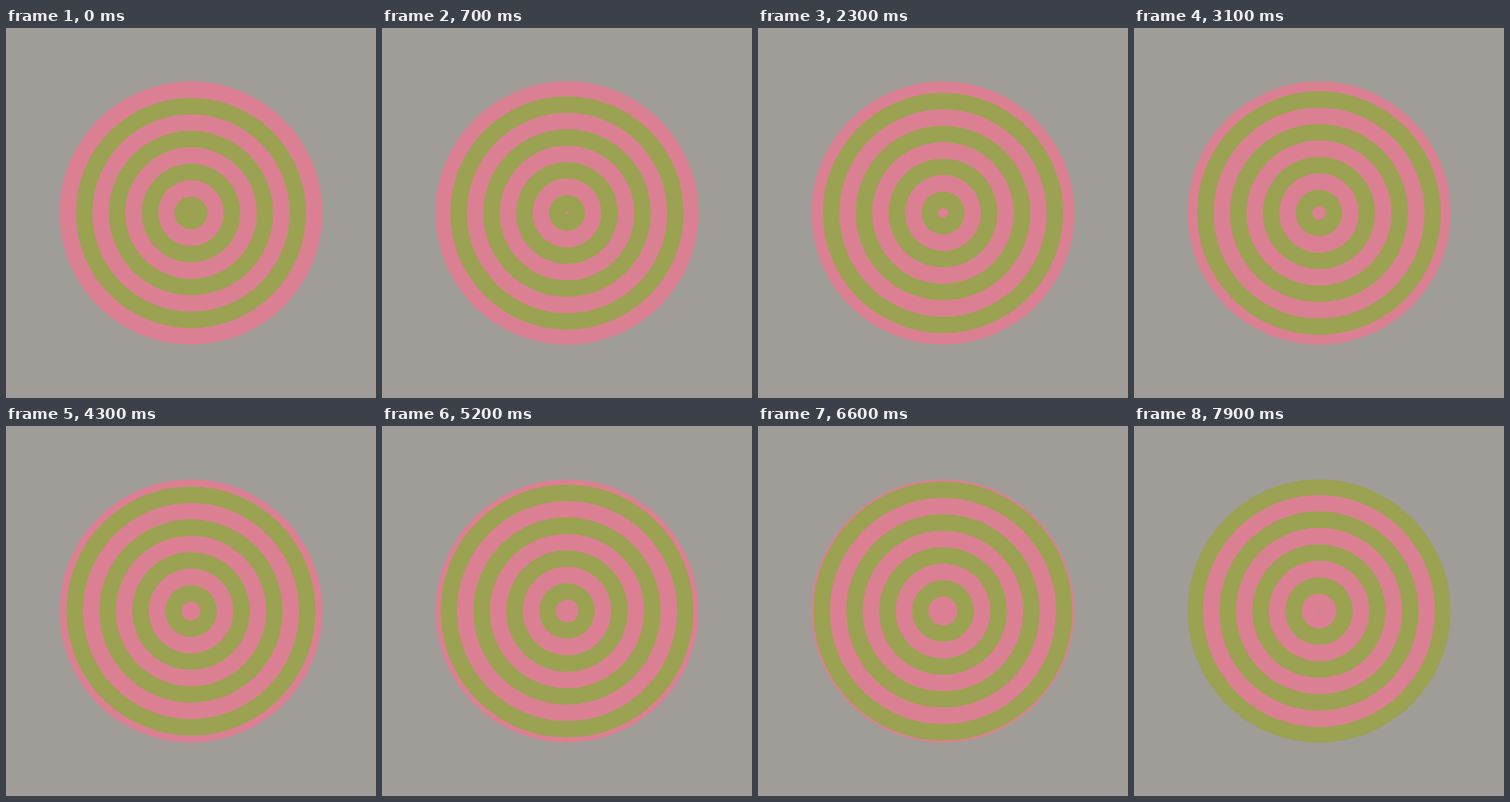
Write an HTML page with a canvas that moves like this. It is 480 px wide and 480 px high and loops after 8 s.

```html
<!DOCTYPE html>
<html lang="en">
<head>
<meta charset="utf-8">
<title>Expanding rings</title>
<style>
  html, body { margin: 0; width: 100%; height: 100%; overflow: hidden; background: #a09c98; }
  canvas { display: block; width: 480px; height: 480px; }
</style>
</head>
<body>
<canvas id="stage" width="480" height="480"></canvas>
<script>
const ctx = document.getElementById('stage').getContext('2d');
const SIZE = 480, CENTER = SIZE / 2;
const RINGS = 8, BAND = 64 / 3, RADIUS = RINGS * BAND;
const BACK = '#a09c98', PINK = '#db8092', GREEN = '#9ba252';
const LOOP = 8000, STEP = 100;
const SPEED = BAND / 7500; // px per ms

function disc(r, color) {
  ctx.fillStyle = color;
  ctx.beginPath();
  ctx.arc(CENTER, CENTER, r, 0, Math.PI * 2);
  ctx.fill();
}

function draw(time) {
  const shift = time * SPEED;
  const born = Math.floor(shift / BAND);
  const inner = shift - born * BAND;
  const colorOf = k => ((k - born) % 2 === 0 ? PINK : GREEN);

  ctx.fillStyle = BACK;
  ctx.fillRect(0, 0, SIZE, SIZE);

  // Band k ends at inner + k * BAND; the outermost one is cut at RADIUS.
  disc(RADIUS, colorOf(RINGS));
  for (let k = RINGS - 1; k >= 0; k--) {
    const r = inner + k * BAND;
    if (r > 0) disc(r, colorOf(k));
  }
}

function frame() {
  const t = performance.now() % LOOP;
  draw(Math.floor(t / STEP) * STEP);
  requestAnimationFrame(frame);
}

draw(0);
requestAnimationFrame(frame);
</script>
</body>
</html>
```
